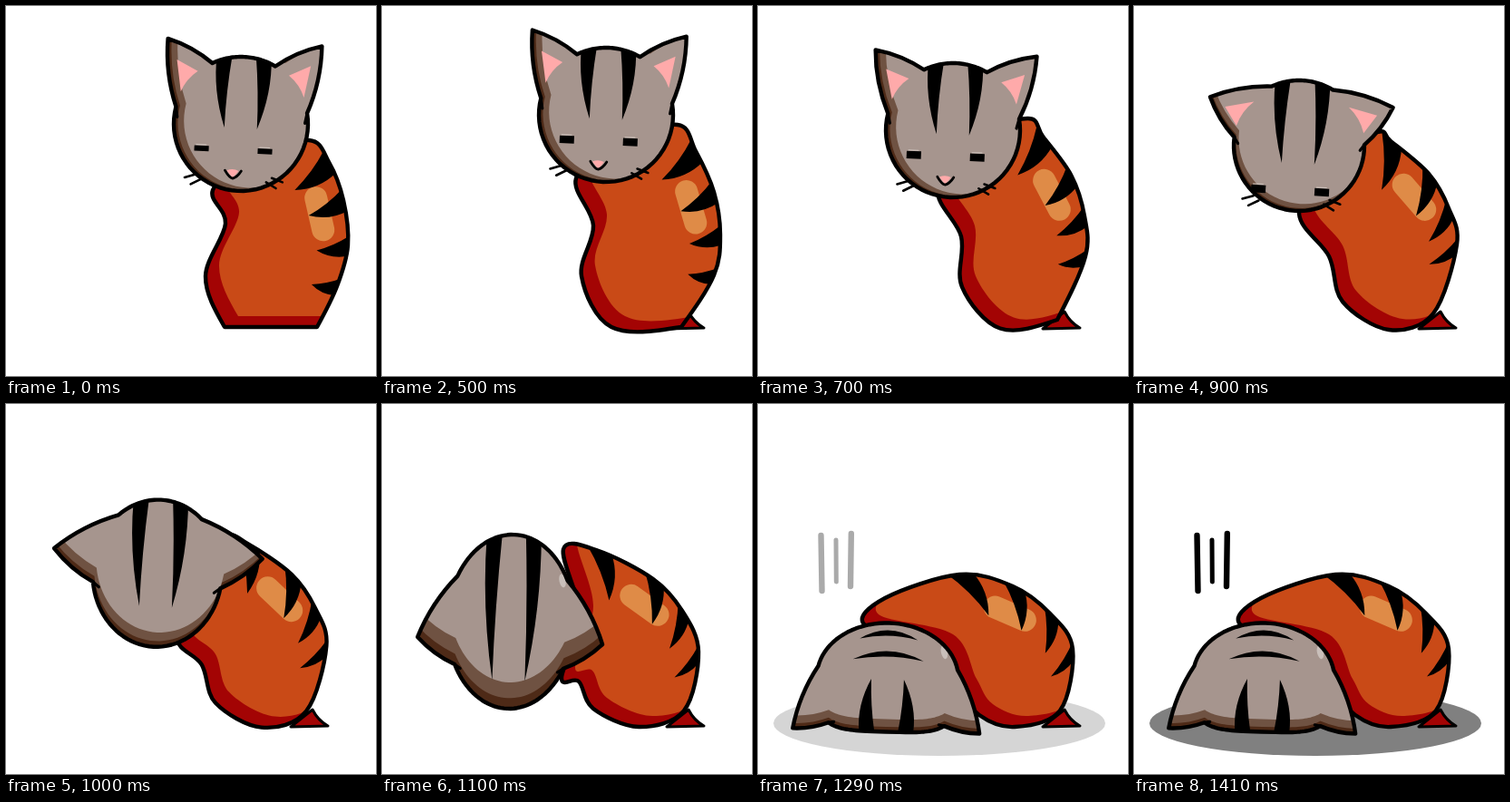
Animation, 408 px wide and 408 px high, one loop 1910 ms. Source, as an HTML page with a canvas:

```html
<!DOCTYPE html>
<html lang="en">
<head>
<meta charset="utf-8">
<title>Sleepy cat</title>
<style>
html, body { margin: 0; width: 100%; height: 100%; overflow: hidden; background: #fff; }
canvas { display: block; width: 408px; height: 408px; }
</style>
</head>
<body>
<canvas id="stage" width="408" height="408"></canvas>
<script>
const ctx = document.getElementById('stage').getContext('2d');
const LOOP = 1910, FLOOR = 356;
const RED = '#a30404', ORANGE = '#c94a17', GLOW = '#df8b47';
const FUR = '#a6958e', BROWN = '#6f5242', DARK = '#4e2a17', PINK = '#ffaaaa';

// Body key points, from the neck down the front, then up the back.
// The four back points carry the stripes; "!" marks a sharp corner.
const points = s => s.split(' ').map(p => [...p.replace('!', '').split(',').map(Number), p[0] === '!']);
const lerp = (a, b, t) => a + (b - a) * t;
const mix = (a, b, t) => Object.fromEntries(Object.keys(a).map(k => [k, k === 'body'
  ? a.body.map((p, i) => [lerp(p[0], b.body[i][0], t), lerp(p[1], b.body[i][1], t), p[2]])
  : lerp(a[k], b[k], t)]));
const stretch = (body, k) => body.map(([x, y, c]) => [x, FLOOR + (y - FLOOR) * k, c]);

// Head: skull ellipse, ear joints as angles on it, ear tip, face pitch, shading offset, stripe ends.
const sit = {
  x: 259, y: 130, rx: 74, ry: 74, tilt: .05, square: 2,
  root: -62, base: -12, tipX: 85, tipY: -90,
  pitch: 0, lid: 6, shadeX: 11, shadeY: -4, barTop: -76, barTip: 5, sag: 8,
  body: points('228,203 242,240 220,298 !241,354 !343,354 365,309 377,264 372,214 356,172 334,148 270,165')
};
const nod = {
  ...sit, x: 247, y: 120, tilt: .042, lid: 8.5, sag: 10,
  body: points('214,190 233,242 220,298 253,354 !330,354 366,297 373,252 366,205 346,160 326,131 262,150')
};
const droop = {
  ...nod, x: 182, y: 154, rx: 72, ry: 72, tilt: .058, base: -4, tipX: 101, tipY: -48,
  pitch: 21, shadeX: 5, shadeY: -8, barTip: 20, sag: 26,
  body: points('182,229 215,276 230,326 281,357 330,339 356,263 347,223 325,185 283,149 268,139 205,165')
};
const fall = {
  ...droop, x: 142, y: 240, rx: 70, ry: 96, tilt: .04, root: -30, base: 31, tipX: 102, tipY: 21,
  pitch: 120, shadeX: 0, shadeY: -29, barTop: -97, barTip: 65, sag: 28,
  body: points('198,302 217,306 233,336 283,356 333,338 349,273 331,228 299,193 239,162 200,160 218,235')
};
const flop = {
  ...fall, x: 143, y: 301.5, rx: 78, ry: 60, tilt: .03, square: 4, root: -10, base: 48, tipX: 103, tipY: 59,
  shadeY: -14, barTop: 60, barTip: 2,
  body: points('200,266 226,315 244,343 283,356 333,338 347,270 322,231 281,201 222,188 140,214 118,244')
};
const lean = { ...nod, x: 215, y: 137, tipX: 89, tipY: -85, sag: 16, body: stretch(mix(nod, droop, .5).body, 1.05) };
const tuck = { ...mix(droop, fall, .38), tipX: 115 };

const steps = [
  [0, sit], [500, nod], [600, mix(nod, lean, .5)], [700, lean], [800, mix(lean, droop, .5)],
  [900, droop], [1000, tuck], [1100, fall], [1130, mix(fall, flop, .5)], [1160, flop]
];

// Closed smooth curve through the points, broken at corners.
function blob(pts) {
  const n = pts.length, at = i => pts[(i + n) % n], path = new Path2D();
  path.moveTo(pts[0][0], pts[0][1]);
  for (let i = 0; i < n; i++) {
    const [o, a, b, e] = [at(i - 1), at(i), at(i + 1), at(i + 2)];
    let c = [0, 1].map(k => a[k] + (b[k] - o[k]) / 6);
    let d = [0, 1].map(k => b[k] - (e[k] - a[k]) / 6);
    if (a[2] && b[2]) { c = a; d = b; }
    else if (a[2]) c = [0, 1].map(k => (a[k] + d[k]) / 2);
    else if (b[2]) d = [0, 1].map(k => (b[k] + c[k]) / 2);
    path.bezierCurveTo(c[0], c[1], d[0], d[1], b[0], b[1]);
  }
  path.closePath();
  return path;
}

function fill(path, color = '#000') {
  ctx.fillStyle = color;
  ctx.fill(path);
}

function ink(path, width = 4.4, color = '#000') {
  ctx.strokeStyle = color;
  ctx.lineWidth = width;
  ctx.stroke(path);
}

function line(x1, y1, x2, y2, width, color) {
  ink(new Path2D(`M${x1} ${y1}L${x2} ${y2}`), width, color);
}

function shifted(x, y, draw) {
  ctx.save();
  ctx.translate(x, y);
  draw();
  ctx.restore();
}

function clipped(path, draw) {
  ctx.save();
  ctx.clip(path);
  draw();
  ctx.restore();
}

// Curve to b, bulging to the left of the way from a.
function bow(path, a, b, k) {
  const dx = b[0] - a[0], dy = b[1] - a[1];
  path.quadraticCurveTo(a[0] + dx / 2 + k * dy, a[1] + dy / 2 - k * dx, b[0], b[1]);
}

// Frame on the back at one key point: along the spine, then inward.
function onBack(body, i) {
  const [x, y] = body[i], [px, py] = body[i + 1], [nx, ny] = body[i - 1];
  const len = Math.hypot(nx - px, ny - py), tx = (nx - px) / len, ty = (ny - py) / len;
  return (along, inward) => [x + tx * along - ty * inward, y + ty * along + tx * inward];
}

function drawBody(p) {
  const body = blob(p.body);
  if (p !== sit) {
    const foot = new Path2D('M314 356L338 337Q344 349 355 355Z');
    fill(foot, RED);
    ink(foot, 3);
  }
  fill(body, RED);
  clipped(body, () => {
    shifted(15, -12, () => fill(body, ORANGE));
    const spot = onBack(p.body, 7);
    line(...spot(-9, 29), ...spot(27, 29), 25, GLOW);
    for (let i = 0; i < 4; i++) {
      const at = onBack(p.body, 8 - i), half = 14 - 1.3 * i;
      const a = at(-half, -2), b = at(half, -2), tip = at(p.sag, 48 - 7 * i);
      const stripe = new Path2D();
      stripe.moveTo(...a);
      bow(stripe, a, tip, .08);
      bow(stripe, tip, b, -.2);
      fill(stripe);
    }
  });
  ink(body);
}

function skull(p, deg) {
  const c = Math.cos(deg * Math.PI / 180), s = Math.sin(deg * Math.PI / 180);
  const e = s > 0 ? 2 / p.square : 1;
  return [p.rx * Math.sign(c) * Math.abs(c) ** e, p.ry * Math.sign(s) * Math.abs(s) ** e];
}

function headPath(p) {
  const path = new Path2D();
  const arc = (from, to) => {
    for (let i = 0; i <= 40; i++) path.lineTo(...skull(p, lerp(from, to, i / 40)));
  };
  const ear = (from, tip, to) => {
    bow(path, from, tip, .1);
    bow(path, tip, to, .1);
  };
  arc(p.base, 180 - p.base);
  ear(skull(p, 180 - p.base), [-p.tipX, p.tipY], skull(p, 180 - p.root));
  arc(180 - p.root, 360 + p.root);
  ear(skull(p, p.root), [p.tipX, p.tipY], skull(p, p.base));
  path.closePath();
  return path;
}

function drawEar(p, side) {
  const ear = [[p.tipX, p.tipY], skull(p, p.root), skull(p, p.base)].map(([x, y]) => [x * side, y]);
  const [tip, root, base] = ear;
  line(...base, lerp(tip[0], base[0], 1.15), lerp(tip[1], base[1], 1.15), 3.2);
  if (p.pitch > 30) return;
  const mid = [0, 1].map(k => (tip[k] + root[k] + base[k]) / 3);
  const [a, b, c] = ear.map(q => [lerp(mid[0], q[0], .47), lerp(mid[1], q[1], .47) + 5]);
  const pink = new Path2D();
  pink.moveTo(...a);
  pink.lineTo(...b);
  bow(pink, b, c, side * .15);
  fill(pink, PINK);
}

function drawBar(p, side) {
  const mid = (p.barTop + p.barTip) / 2, x = v => v * side;
  const bar = new Path2D();
  bar.moveTo(x(13), p.barTop);
  bar.quadraticCurveTo(x(18), mid, x(18), p.barTip);
  bar.quadraticCurveTo(x(33), mid, x(30), p.barTop);
  fill(bar);
}

function drawFace(p) {
  ctx.fillStyle = '#000';
  for (const x of [-42, 28]) {
    ctx.fillRect(x - 8, 29 + p.pitch - p.lid / 2, 16, p.lid);
    line(x - 6, 28 + p.pitch - p.lid / 2, x + 5, 28 + p.pitch - p.lid / 2, 1, '#cfc5bf');
  }
  shifted(-6, 56 + p.pitch, () => {
    fill(new Path2D('M-7 -4Q0 -7 6 -4L0 4Z'), PINK);
    ink(new Path2D('M-9 -4Q-4 4 0 4.5Q5 3 9 -4'), 2.8);
  });
}

function drawWhiskers(side) {
  for (const i of [0, 1]) line(side * (54 - 7 * i) - 5, 62 + 7 * i, side * (42 - 6 * i) - 5, 58 + 5 * i, 2.6);
}

function drawHead(p) {
  const head = headPath(p);
  fill(head, DARK);
  clipped(head, () => {
    shifted(p.shadeX * .4, p.shadeY * .4, () => fill(head, BROWN));
    shifted(p.shadeX, p.shadeY, () => fill(head, FUR));
    for (const side of [-1, 1]) {
      drawBar(p, side);
      drawEar(p, side);
    }
    drawFace(p);
    if (p.pitch > 100) {
      const [x, y] = skull(p, -32), glint = new Path2D();
      glint.ellipse(x * .93, y * .93, 3.5, 7.5, -.25, 0, 7);
      fill(glint, '#c9bfba');
    }
  });
  ink(head);
  if (p.pitch < 30) [-1, 1].forEach(drawWhiskers);
  if (p === flop) for (const i of [0, 1]) {
    const w = 32 + 7 * i, y = 23 * i - 42;
    fill(new Path2D(`M${-w} ${y}Q0 ${y - 20} ${w} ${y}Q0 ${y - 8} ${-w} ${y}Z`));
  }
}

function drawImpact(alpha) {
  ctx.globalAlpha = alpha;
  const shade = new Path2D();
  shade.ellipse(200, 352, 183, 36, 0, 0, 7);
  fill(shade, '#808080');
  line(69.5, 145, 70.5, 206, 6.4);
  line(86, 150, 86.3, 196, 5);
  line(102.8, 143, 102, 201, 6.4);
  ctx.globalAlpha = 1;
}

function draw(t) {
  const p = steps.filter(s => s[0] <= t).pop()[1];
  ctx.fillStyle = '#fff';
  ctx.fillRect(0, 0, 408, 408);
  const alpha = Math.min(1, Math.floor((t - 1230) / 30) / 6);
  if (alpha > 0) drawImpact(alpha);
  drawBody(p);
  shifted(p.x, p.y, () => {
    ctx.rotate(p.tilt);
    drawHead(p);
  });
}

ctx.lineCap = ctx.lineJoin = 'round';
const start = performance.now();
function tick() {
  draw((performance.now() - start) % LOOP);
  requestAnimationFrame(tick);
}
tick();
</script>
</body>
</html>
```
